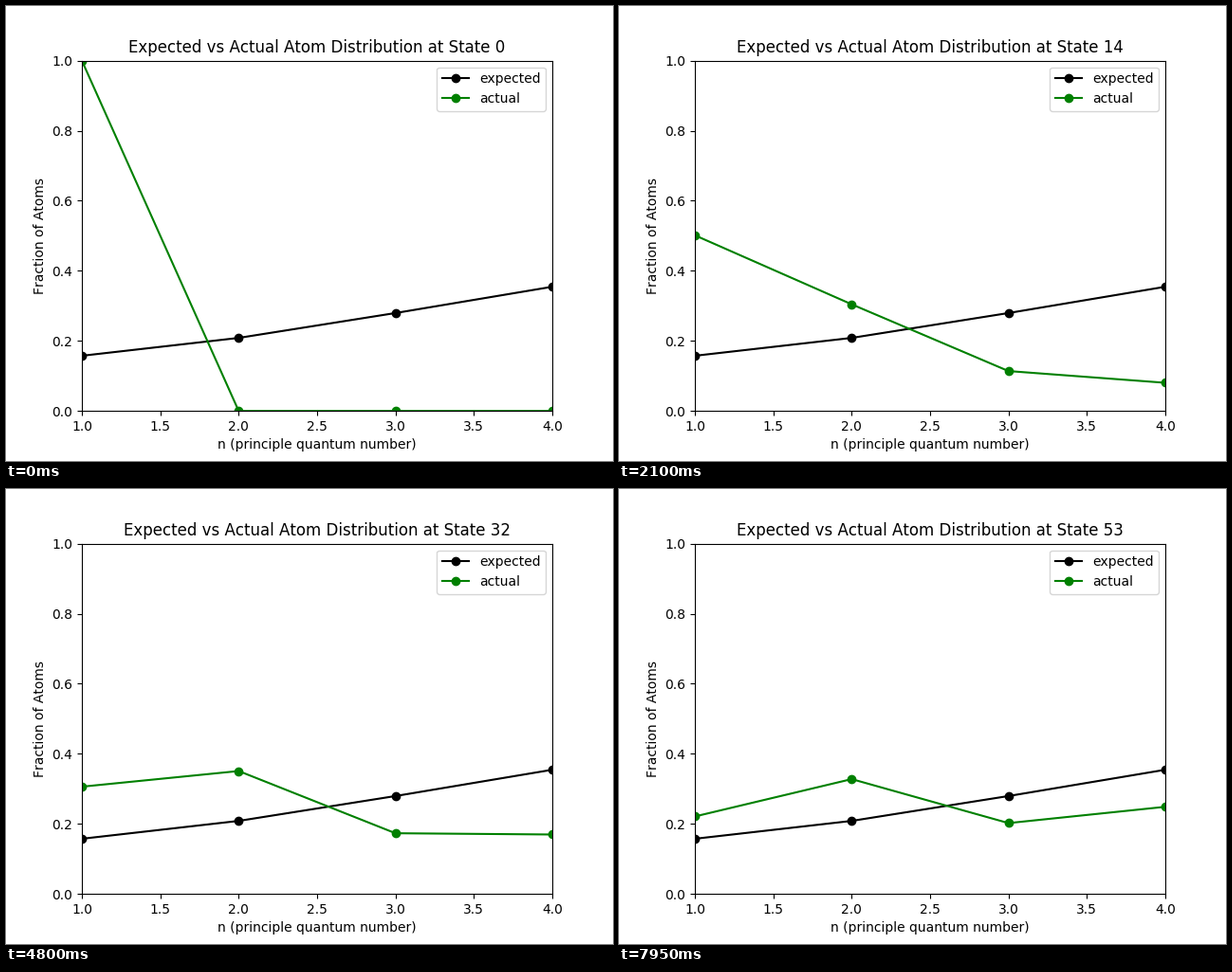
Animation, 640 px wide and 480 px high, one loop 8 s. Source, as a matplotlib script:

```python
import matplotlib.pyplot as plt
import numpy as np
from matplotlib.animation import FuncAnimation

TICK_MS = 50
TICKS_PER_STATE = 3
TICKS = 160

plt.rcParams["text.kerning_factor"] = 6  # whole-pixel kerning

levels = np.arange(1, 5)
expected = [0.1575, 0.2085, 0.2795, 0.3545]


def populations(state):
    """Fractions per level: all atoms start in level 1 and spread upwards."""
    u = 1 - np.exp(-state / 40)
    first = 1 - u * (2.4035 - 2.82 * u + 1.35 * u**2)
    third = u * (0.491 - 0.40 * u + 0.145 * u**2)
    fourth = u * (0.2404 + 0.09 * u + 0.06 * u**2)
    return first, 1 - first - third - fourth, third, fourth


fig, ax = plt.subplots(figsize=(6.4, 4.8), dpi=100)
ax.plot(levels, expected, "ko-", label="expected")
actual_line, = ax.plot(levels, populations(0), "go-", label="actual")
ax.set_xlim(1, 4)
ax.set_ylim(0, 1)
ax.set_xlabel("n (principle quantum number)")
ax.set_ylabel("Fraction of Atoms")
ax.legend(loc="upper right")
title = ax.set_title("")


def update(tick):
    state = tick // TICKS_PER_STATE
    actual_line.set_ydata(populations(state))
    title.set_text(f"Expected vs Actual Atom Distribution at State {state}")
    return actual_line, title


anim = FuncAnimation(fig, update, frames=TICKS, interval=TICK_MS,
                     repeat=True, repeat_delay=0, blit=False)
plt.show()
```
